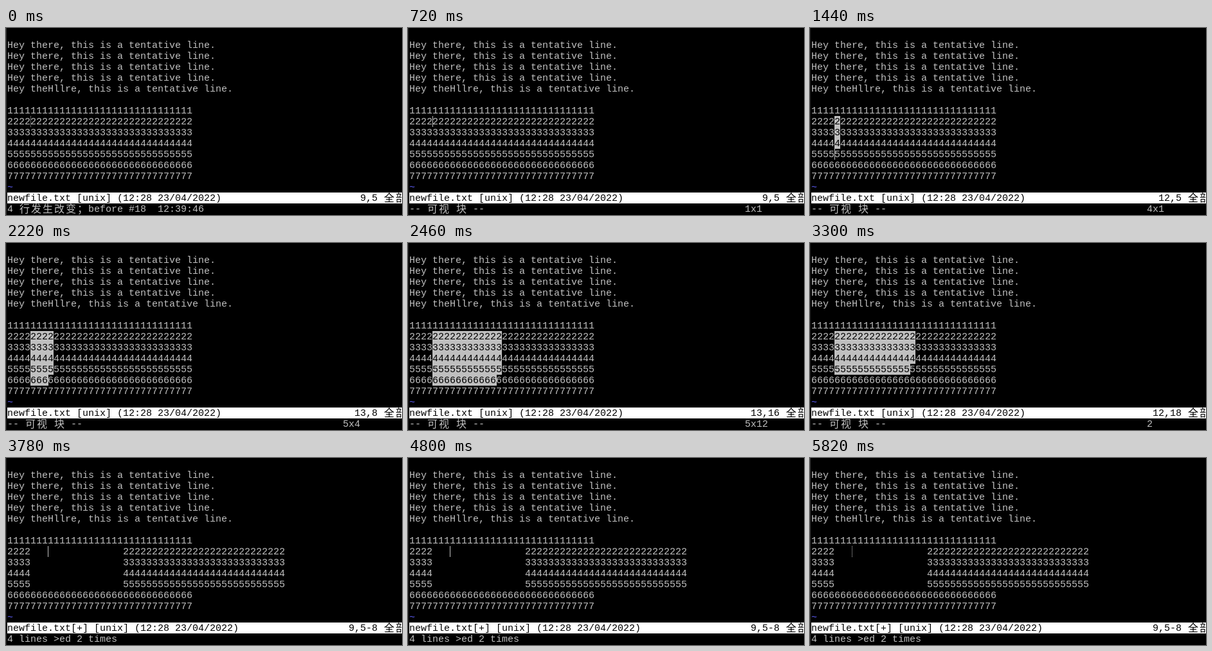
An HTML page with a canvas that plays this animation: 616x291 px, repeating every 6360 ms.

```html
<!DOCTYPE html>
<html lang="zh">
<head>
<meta charset="utf-8">
<style>
html, body { margin: 0; width: 100%; height: 100%; overflow: hidden; background: #000; }
canvas { display: block; }
</style>
</head>
<body>
<canvas id="term" width="616" height="291"></canvas>
<script>
const ctx = document.getElementById("term").getContext("2d");
const LOOP = 6360, CELL = 9, LINE = 17, LEFT = 2;
const FG = "#bfbfbf", BLACK = "#000", WHITE = "#fff", BLUE = "#6060ff";
const LATIN = '15px "Liberation Mono", monospace';
const HAN = '16px "Noto Sans CJK SC", "Noto Sans CJK", sans-serif';

const x = col => LEFT + col * CELL;
const y = line => 1 + (line - 1) * LINE;
const countPassed = (times, t) => times.filter(s => t >= s).length;

function box(color, left, top, w, h) {
  ctx.fillStyle = color;
  ctx.fillRect(left, top, w, h);
}

// Text on the terminal grid; wide characters take two cells.
function put(text, line, col = 0, color = FG) {
  ctx.fillStyle = color;
  for (const ch of text) {
    const wide = ch > "\u2e80";
    ctx.font = wide ? HAN : LATIN;
    ctx.fillText(ch, x(col) + (wide ? 1 : 0), y(line) + (wide ? 14 : 13));
    col += wide ? 2 : 1;
  }
}

function mark(digit, line, col, count) {
  box(FG, x(col), y(line), count * CELL, LINE);
  put(digit.repeat(count), line, col, BLACK);
}

function status(name, pos) {
  box(WHITE, LEFT, y(16), 616, LINE);
  put(name + " [unix] (12:28 23/04/2022)", 16, 0, BLACK);
  put(pos, 16, 64 - pos.length, BLACK);
  put("全部", 16, 65, BLACK);
}

function cursor(line, col, dotted) {
  for (let i = 0; i < LINE; i += dotted ? 2 : 1) box(FG, x(col), y(line) + i, 1, 1);
}

function selection(t) {
  const rows = t >= 2700 ? 4 : 1 + countPassed([1080, 1260, 1440, 1560], t);
  const cols = t < 1680 ? 1 : t < 2220 ? 2 : Math.min(14, 4 + 2 * Math.floor((t - 2220) / 60));
  return { rows, cols };
}

function draw(t) {
  const focused = t >= 180 && t < 5820;
  const visual = t >= 720 && t < 3780;
  const shifted = t >= 3780;
  const { rows, cols } = selection(t);
  const line = shifted ? 9 : 8 + rows;
  const col = shifted ? 7 : 3 + cols;

  box(BLACK, 0, 0, 616, 291);
  box(focused ? "#1c1c1c" : "#333", 0, 0, 1, 291);

  for (let i = 2; i <= 6; i++) put(`Hey the${i === 6 ? "Hll" : ""}re, this is a tentative line.`, i);
  for (let d = 1; d <= 7; d++) {
    const gap = shifted && d > 1 && d < 6 ? 16 : 0;
    put(String(d).repeat(4) + " ".repeat(gap) + String(d).repeat(28), 7 + d);
  }
  put("~", 15, 0, BLUE);

  if (visual) {
    for (let r = 0; r < rows; r++) {
      // The cell under the cursor stays unmarked.
      mark(String(r + 2), 9 + r, 4, r === rows - 1 ? cols - 1 : cols);
    }
    put("-- 可视 块 --", 17);
    put(t >= 3240 ? "2" : `${rows}x${cols}`, 17, 58);
  } else {
    put(shifted ? "4 lines >ed 2 times" : "4 行发生改变；before #18  12:39:46", 17);
  }

  status(shifted ? "newfile.txt[+]" : "newfile.txt", shifted ? "9,5-8" : `${line},${col + 1}`);

  const blinkOff = countPassed([3180, 3240, 4260, 4800, 5340, 5820], t) % 2;
  if (!blinkOff) cursor(line, col, !focused);
}

function frame(now) {
  draw(now % LOOP);
  requestAnimationFrame(frame);
}
requestAnimationFrame(frame);
</script>
</body>
</html>
```
